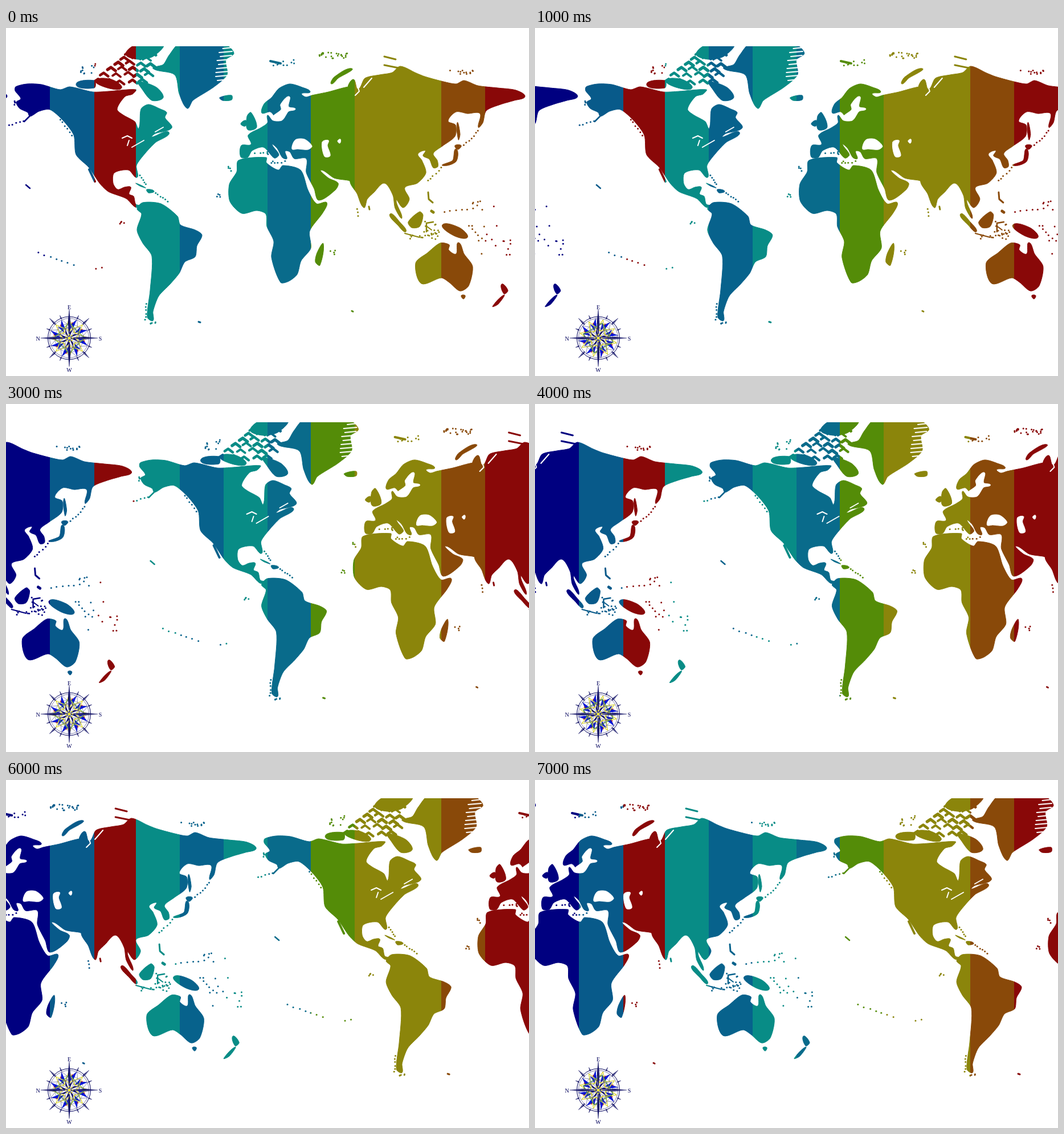
Animation of 918 by 610 pixels, one loop 8000 ms. Source, as an HTML page:

```html
<!DOCTYPE html>
<html lang="en">
<head>
<meta charset="utf-8">
<title>World zones</title>
<style>
html, body { margin: 0; width: 100%; height: 100%; overflow: hidden; background: #fff; }
svg { display: block; width: 918px; height: 610px; }
text { font: 10px "Liberation Serif", serif; fill: #00005c; text-anchor: middle; }
.line { fill: none; stroke-linecap: round; stroke-linejoin: round; }
</style>
</head>
<body>
<svg viewBox="0 0 918 610">
  <defs>
    <mask id="atlas" maskUnits="userSpaceOnUse" x="0" y="32" width="918" height="578">
      <g id="drift"><g id="world"></g><use href="#world" x="-909"/></g>
    </mask>
  </defs>
  <g id="bands" mask="url(#atlas)"></g>
  <g id="compass" transform="translate(111 543.5)"></g>
</svg>
<script>
const STEP = 1000, STEPS = 8, SHIFT = 72.86;
const land = '#fff', sea = '#000', navy = '#00005c';
const $ = id => document.getElementById(id);
const repeat = (n, part) => Array.from({ length: n }, (_, i) => part(i)).join('');

let seed = 7;
const random = () => (seed = seed * 16807 % 2147483647) / 2147483647;
const jitter = size => (random() - .5) * 2 * size;

const bands = [[0, '#000080'], [77, '#085a8a'], [155, '#890808'], [228, '#088c86'],
  [305, '#07628c'], [382, '#088c86'], [459, '#096b8b'], [535, '#548c08'],
  [612, '#8b850b'], [764, '#894909'], [841, '#890808'], [918]];

// Smooth closed outline through key points
function outline(text) {
  const pts = text.split(' ').map(p => p.split(',').map(Number));
  const at = i => pts[(i + pts.length) % pts.length];
  const handle = (i, reach) => {
    const [x0, y0] = at(i - 1), [x, y] = at(i), [x1, y1] = at(i + 1);
    const k = reach / (Math.hypot(x1 - x0, y1 - y0) || 1);
    return [x + (x1 - x0) * k, y + (y1 - y0) * k];
  };
  return `M${pts[0]}` + pts.map((p, i) => {
    const q = at(i + 1), reach = Math.hypot(q[0] - p[0], q[1] - p[1]) * .25;
    return `C${handle(i, reach)} ${handle(i + 1, -reach)} ${q}`;
  }).join('') + 'Z';
}
const area = (text, color = land) => `<path d="${outline(text)}" fill="${color}" stroke="${color}"/>`;
const line = (w, pts, color = land) =>
  `<polyline class="line" points="${pts}" stroke="${color}" stroke-width="${w}"/>`;
const dot = (x, y, r = 1.5) => `<circle cx="${x}" cy="${y}" r="${r}" fill="${land}"/>`;
const chain = (n, x0, y0, x1, y1) => repeat(n, i => {
  const t = i / (n - 1);
  return dot(x0 + (x1 - x0) * t + jitter(1), y0 + (y1 - y0) * t + jitter(1));
});
const scatter = (n, x, y, rx, ry) => repeat(n, () => dot(x + jitter(rx), y + jitter(ry)));

const continents = {
  northAmerica: '17,103 37,98 62,99 95,108 112,103 152,112 180,111 228,108 222,116 209,120 195,142 205,152 226,164 233,176 237,142 250,134 271,142 282,148 279,157 291,175 262,185 256,191 286,183 262,201 244,220 229,241 230,262 215,249 190,254 188,272 196,283 208,279 219,279 216,291 224,295 228,309 241,313 227,314 211,299 180,287 165,273 145,244 123,222 119,188 100,162 77,143 58,146 42,155 38,148 24,141 18,130 26,124 16,110',
  southAmerica: '230,317 240,306 272,308 301,330 306,345 332,354 344,363 335,382 332,401 314,410 304,430 288,449 268,470 258,497 258,513 248,507 253,460 256,400 240,377 230,354 238,326',
  greenland: '258,71 276,64 286,48 306,26 380,26 400,44 386,56 388,82 364,104 328,127 318,141 304,115 296,82',
  africa: '408,232 457,227 457,236 478,249 486,241 517,249 530,284 545,308 563,306 556,324 533,356 535,386 518,408 511,432 496,444 482,446 466,402 470,374 458,348 456,326 440,320 414,325 393,304 392,274 405,252',
  europe: '449,149 453,133 466,122 479,106 498,98 520,104 534,112 519,115 526,121 537,118 566,112 602,103 614,108 616,270 600,267 576,263 553,249 566,263 583,272 578,284 549,302 541,282 527,253 527,229 506,229 498,217 490,216 493,229 485,227 476,211 467,204 479,222 471,228 452,209 432,215 424,227 412,226 413,206 430,204 425,188 447,175 459,166 459,153 466,160 472,158 464,147',
  asia: '600,104 610,90 618,107 630,88 656,82 678,78 692,67 720,79 735,85 764,93 790,98 804,92 828,101 863,105 895,109 911,120 892,127 868,134 843,145 837,166 829,174 832,150 810,150 790,147 776,163 789,170 788,190 766,207 750,220 757,232 758,243 750,245 743,230 732,224 736,215 723,221 730,232 737,254 722,272 700,280 708,300 697,315 685,302 695,333 683,316 679,293 664,272 646,288 634,300 628,315 616,290 604,270',
  australia: '719,412 740,394 762,377 778,380 777,389 790,396 794,376 804,396 819,418 812,452 797,461 778,446 764,438 729,448'
};

const islands = [
  '232,94 264,104 276,122 256,127 238,106', '210,46 230,28 276,28 258,50 232,55', // Arctic
  '157,92 185,90 203,105 178,105', '123,99 155,92 155,105',
  '375,122 396,118 396,126 380,127',                        // Iceland
  '424,178 423,155 430,148 440,174', '412,168 421,162 420,172', // British Isles
  '571,98 576,86 607,71 583,88',                            // Novaya Zemlya
  '543,410 546,394 557,378 551,416',                        // Madagascar
  '706,340 726,322 732,328 726,348 712,350',                // Borneo
  '674,326 692,341 702,357 688,346',                        // Sumatra
  '766,345 796,350 810,367 786,364',                        // New Guinea
  '766,241 784,232 790,212 790,234', '788,206 799,206 793,213', // Japan
  '792,166 797,186 794,196',                                // Sakhalin
  '870,449 881,460 874,466', '874,468 864,484 854,488',     // New Zealand
  '799,469 806,469 803,475', '228,272 245,280 235,277', '247,283 260,286 250,289'
];

const seas = [
  '466,159 484,162 496,146 508,142 496,138 497,120 482,134 483,143',
  '502,212 508,196 524,195 537,207 530,213 512,212',
  '555,200 566,197 564,206 569,224 559,225', '582,198 587,195 586,202'
];

// width, then key points
const strokes = [
  [2, '700,360 726,367'], [2.5, '738,357 738,342 750,340'], [2, '739,348 747,354'],
  [3, '741,288 742,300 749,306'], [5, '747,321 750,323'], [2.5, '35,275 42,281'],
  [4, '146,248 156,269'], [3, '664,50 684,55'], [3, '664,65 704,73'], [4, '464,58 482,62'],
  [2.5, '41,155 32,164'], [3, '637,313 638,318'], [3, '607,496 609,497'], [3, '338,515 341,516']
];
const lakes = [
  [2, '204,193 213,189 221,193'], [2, '213,206 216,197'], [2, '221,209 242,197'],
  [2, '262,182 276,174'], [2, '613,118 620,111 614,92'], [2, '628,104 642,88']
];

// count, from, to
const chains = [
  [5, 30, 164, 6, 170], [7, 829, 180, 804, 206], [5, 236, 258, 246, 274],
  [6, 262, 290, 283, 304], [6, 246, 484, 245, 512], [6, 740, 268, 764, 245],
  [6, 95, 160, 116, 188], [7, 57, 394, 119, 415], [2, 157, 422, 169, 420],
  [3, 617, 317, 618, 329], [6, 770, 322, 820, 317], [6, 812, 346, 841, 374]
];
// count, centre, half size
const groups = [
  [26, 575, 48, 25, 5], [12, 798, 76, 22, 5], [10, 490, 60, 26, 7], [12, 145, 72, 14, 9],
  [18, 750, 352, 18, 14], [22, 852, 350, 36, 52], [10, 735, 367, 28, 4],
  [4, 204, 340, 4, 3], [4, 373, 294, 4, 3], [4, 392, 246, 4, 6], [4, 572, 380, 6, 26],
  [6, 478, 235, 18, 2], [6, 450, 219, 14, 3], [5, 258, 517, 8, 3], [4, 14, 130, 8, 5]
];

// Rows of slanted slivers, each row reaching further west
const archipelago = repeat(6, row => repeat(3 + (row >> 1), i => {
  const x = 212 - row * 11 + i * 19 + jitter(3), y = 44 + row * 10 + jitter(3);
  return line(4.5 + jitter(1), `${x},${y} ${x + 6},${y - 4} ${x + 14},${y + 2}`);
}));
const fjords = repeat(9, i => {
  const y = 36 + i * 7, x = 390 - i;
  return line(1.8, `${x - 14 + jitter(5)},${y} ${x + 8},${y - 2}`, sea);
});

$('world').innerHTML =
  Object.values(continents).concat(islands).map(s => area(s)).join('') +
  seas.map(s => area(s, sea)).join('') + fjords + archipelago +
  lakes.map(([w, pts]) => line(w, pts, sea)).join('') +
  strokes.map(s => line(...s)).join('') +
  chains.map(c => chain(...c)).join('') + groups.map(g => scatter(...g)).join('');

$('bands').innerHTML = bands.slice(0, -1).map(([x, color], i) =>
  `<rect x="${x}" y="32" width="${bands[i + 1][0] - x}" height="578" fill="${color}"/>`).join('');

// Compass
const ring = (r, w, color = navy) => `<circle r="${r}" fill="none" stroke="${color}" stroke-width="${w}"/>`;
const spin = (n, from, part) => repeat(n, i => `<g transform="rotate(${from + i * 360 / n})">${part}</g>`);
const point = (r, w, mid, left, right, base = 0) =>
  `<path d="M0 ${-base}L${-w} ${-mid}L0 ${-r}Z" fill="${left}"/><path d="M0 ${-base}L${w} ${-mid}L0 ${-r}Z" fill="${right}"/>` +
  `<path d="M0 ${-base}L${-w} ${-mid}L0 ${-r}L${w} ${-mid}Z" fill="none" stroke="${navy}" stroke-width=".4"/>`;
const star = (r, skip, color, w) => {
  const tips = Array.from({ length: 9 }, (_, i) => {
    const a = i * skip * Math.PI / 4;
    return [r * Math.sin(a), -r * Math.cos(a)].map(v => v.toFixed(1));
  });
  return line(w, tips.join(' '), color);
};

$('compass').innerHTML =
  ring(37.5, 1) + ring(34.5, .5) +
  spin(8, 22.5, point(43, .8, 37, navy, navy, 36)) +
  spin(4, 45, point(49, 1.6, 37, navy, '#6a6aa0', 33)) +
  '<g id="rose">' +
    spin(8, 22.5, point(35, 6, 24, '#0a18e0', '#fff', 15)) +
    spin(8, 0, point(28, 4, 20, '#fff', '#1522c8', 12)) +
    star(33, 3, '#d8d42a', 1.2) + star(27, 2, '#4a9c3a', .8) +
    spin(8, 11, '<circle cy="-27" r="1.1" fill="#d22a1e"/>') +
    spin(8, 22.5, point(17, 3, 10, '#10106a', '#fff')) +
  '</g>' +
  ring(18, .6) + ring(25, .4) +
  spin(4, 0, point(50, 2, 28, navy, '#30307c')) +
  spin(8, 0, '<circle cy="-6" r="1.3" fill="#d8d42a"/>') +
  '<circle r="2.6" fill="#e8e23c"/>' +
  [['E', 0, -51], ['N', -55, 4], ['S', 54.5, 4], ['W', 0, 59]]
    .map(([c, x, y]) => `<text x="${x}" y="${y}">${c}</text>`).join('');

function draw(now) {
  const k = Math.floor(now / STEP) % STEPS;
  $('drift').setAttribute('transform', `translate(${k * SHIFT} 0)`);
  $('rose').setAttribute('transform', `rotate(${k % 3 * 15})`);
}
const start = performance.now();
function tick() {
  draw(performance.now() - start);
  requestAnimationFrame(tick);
}
tick();
</script>
</body>
</html>
```
